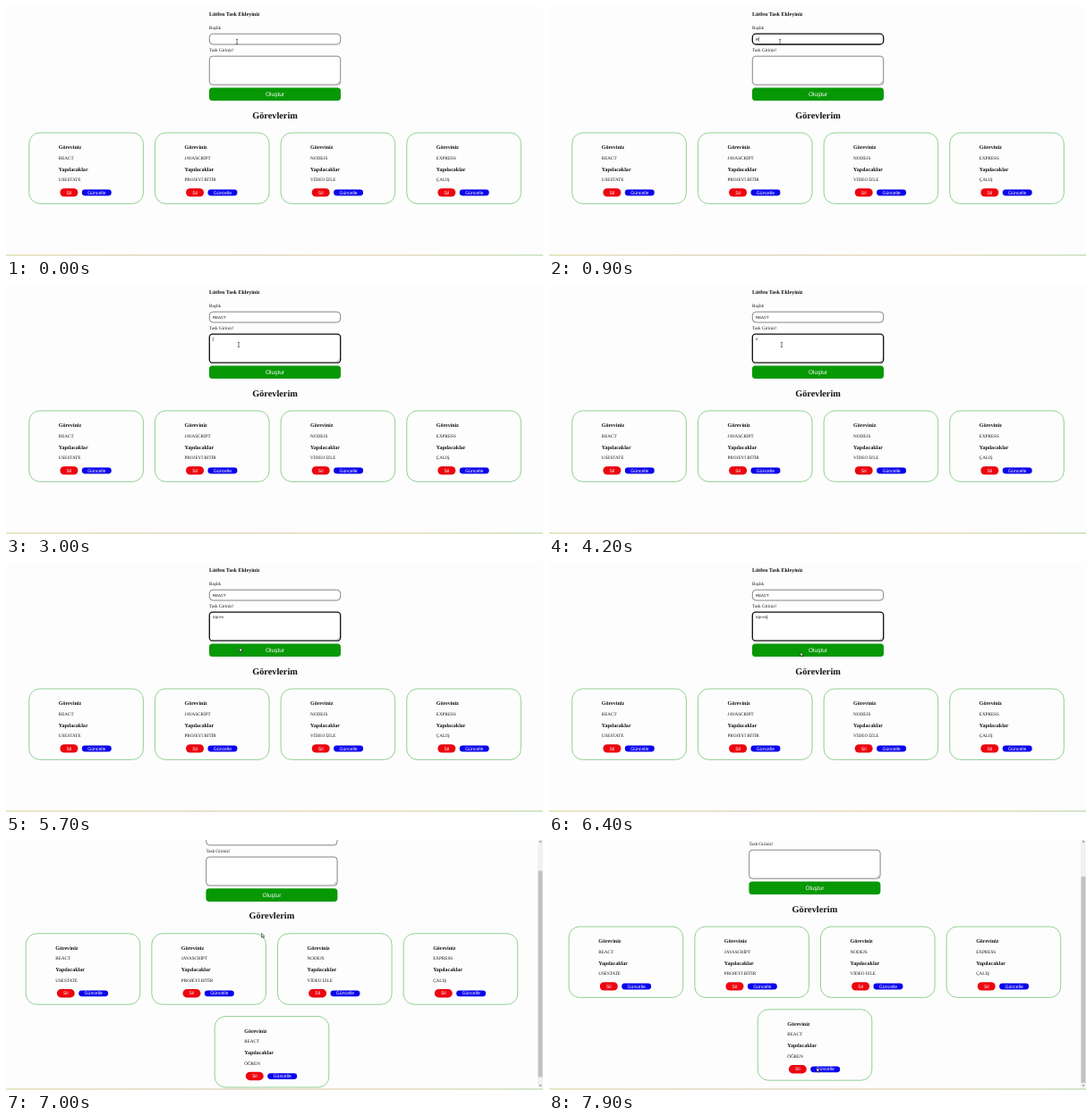
An HTML page that plays this animation: 600 px wide and 280 px high, repeating every 8 s.

```html
<!DOCTYPE html>
<html lang="tr">
<head>
<meta charset="utf-8">
<title>Görevlerim</title>
<style>
  html, body { margin: 0; width: 100%; height: 100%; overflow: hidden; background: #fefdfe; }
  svg { display: block; width: 600px; height: 280px; }
  text { font: 5.15px "Liberation Serif", "Times New Roman", serif; fill: #111; text-rendering: geometricPrecision; }
  .h3 { font-size: 6.03px; font-weight: bold; }
  .h1 { font-size: 10.3px; font-weight: bold; text-anchor: middle; }
  .btn { font-family: "Liberation Sans", Arial, sans-serif; fill: #fff; text-anchor: middle; }
  .big { font-size: 6.5px; }
  .field { font: 4.35px "Liberation Sans", Arial, sans-serif; }
  .mono { font: 4.1px "Liberation Mono", monospace; }
  .box { fill: #fff; stroke: #666; stroke-width: .8; }
  .box.on { stroke: #0c0c0c; stroke-width: 1.3; }
  .card { fill: none; stroke: #86cb86; stroke-width: .9; }
</style>
</head>
<body>
<svg id="stage" viewBox="0 0 600 280">
  <defs>
    <linearGradient id="strip">
      <stop offset="0" stop-color="#e9e6c6"/>
      <stop offset=".35" stop-color="#e6e0cf"/>
      <stop offset=".7" stop-color="#eee2cd"/>
      <stop offset="1" stop-color="#d5e6cb"/>
    </linearGradient>
  </defs>
</svg>
<script>
const LOOP = 8000, STEP = 100, SUBMIT = 6500;
const stage = document.getElementById('stage');

function add(parent, tag, attrs = {}, text = '') {
  const el = document.createElementNS('http://www.w3.org/2000/svg', tag);
  for (const key in attrs) el.setAttribute(key, attrs[key]);
  el.textContent = text;
  return parent.appendChild(el);
}
const rect = (p, x, y, width, height, rx, more) => add(p, 'rect', { x, y, width, height, rx, ...more });
const label = (p, x, y, text, cls = '') => add(p, 'text', { x, y, class: cls }, text);
const show = (el, on) => el.setAttribute('visibility', on ? 'visible' : 'hidden');
const move = (el, x, y) => el.setAttribute('transform', `translate(${x} ${y})`);

const page = add(stage, 'g');

// Form
label(page, 227, 10.9, 'Lütfen Task Ekleyiniz', 'h3');
label(page, 227, 26.3, 'Başlık');
const titleBox = rect(page, 227.3, 31.2, 146.4, 11.8, 4, { class: 'box' });
label(page, 227, 51, 'Task Giriniz!');
const taskBox = rect(page, 227.3, 56.2, 146.4, 32, 3.5, { class: 'box' });
add(page, 'path', { d: 'M369.6 87.2l3-3M371.2 87.2l1.4-1.4', stroke: '#777', 'stroke-width': .5 });
rect(page, 227, 91.5, 147, 14.6, 3.6, { fill: '#079806' });
label(page, 300.5, 101.1, 'Oluştur', 'btn big');
label(page, 300.5, 125.6, 'Görevlerim', 'h1');
const titleText = label(page, 231, 38.8, '', 'field');
const taskText = label(page, 231, 63.4, '', 'mono');
const caret = add(page, 'path', { d: 'M0 0v4.6', stroke: '#111', 'stroke-width': .5 });

// Task cards
function card(x, y, title, task) {
  const g = add(page, 'g');
  move(g, x, y);
  rect(g, 0, 0, 127.6, 79.4, 12, { class: 'card' });
  label(g, 33, 18.2, 'Göreviniz', 'h3');
  label(g, 33, 29.5, title);
  label(g, 33, 42.7, 'Yapılacaklar', 'h3');
  label(g, 33, 54.2, task);
  rect(g, 34.6, 62.2, 20, 9.4, 4.7, { fill: '#ec0610' });
  label(g, 44.6, 68.7, 'Sil', 'btn');
  rect(g, 59, 63.6, 33, 6.8, 3.4, { fill: '#0a05ec' });
  label(g, 75.5, 68.7, 'Güncelle', 'btn');
  return g;
}
[['REACT', 'USESTATE'], ['JAVASCRİPT', 'PROJEYİ BİTİR'], ['NODEJS', 'VİDEO İZLE'], ['EXPRESS', 'ÇALIŞ']]
  .forEach((c, i) => card(25.8 + i * 140.65, 142, ...c));
const newCard = card(236.8, 234.8, 'REACT', 'ÖĞREN');

// Scrollbar and bottom strip
const bar = add(stage, 'g');
rect(bar, 594, 0, 6, 278, 0, { fill: '#f1f1f1' });
const thumb = rect(bar, 594.5, 4, 5, 231, 0, { fill: '#c1c1c1' });
add(bar, 'path', { d: 'M595.8 2.2l1.3-1.5 1.3 1.5zM595.8 274.6l1.3 1.5 1.3-1.5z', fill: '#555' });
rect(stage, 0, 278, 600, 2, 0, { fill: 'url(#strip)' });

// Mouse pointers
const beam = add(stage, 'path', { d: 'M-1.1 -2.6h2.2M0 -2.6v5.2M-1.1 2.6h2.2', stroke: '#222', 'stroke-width': .6 });
const arrow = add(stage, 'path', {
  d: 'M0 0v4.6l1.1-1 .8 1.8.8-.4-.8-1.7h1.5z', fill: '#fff', stroke: '#111', 'stroke-width': .55
});

// Keys are [time, ...values]
const mouse = [[0, 258, 40], [2600, 258, 40], [2900, 260, 68], [5200, 260, 68], [5600, 261, 96],
  [6000, 261, 96], [6400, 281, 101], [6800, 281, 101], [7000, 285.5, 104.5], [7200, 286, 106], [7700, 299, 255]];
const scroll = [[6700, 0], [6800, .9], [6900, 18], [7000, 37.2], [7100, 43.5], [7200, 45]];
const titleKeys = [700, 1000, 1200, 1500, 1800];
const taskKeys = [3600, 4300, 4500, 4700, 4900];

function at(keys, t) {
  const n = keys.findIndex(k => k[0] > t);
  if (n < 1) return (n ? keys[keys.length - 1] : keys[0]).slice(1);
  const a = keys[n - 1], b = keys[n], u = (t - a[0]) / (b[0] - a[0]);
  return a.slice(1).map((v, i) => v + (b[i + 1] - v) * u);
}

function draw(t) {
  const sent = t >= SUBMIT;
  const inTitle = t >= 400 && t < 3000;
  const inTask = t >= 3000 && !sent;
  const typed = keys => sent ? 0 : keys.filter(k => k <= t).length;
  const nTitle = typed(titleKeys), nTask = typed(taskKeys);

  titleText.textContent = 'REACT'.slice(0, nTitle);
  taskText.textContent = 'öğren'.slice(0, nTask);
  titleBox.classList.toggle('on', inTitle);
  taskBox.classList.toggle('on', inTask);

  const last = Math.max(inTitle ? 400 : 3000, ...titleKeys.concat(taskKeys).filter(k => k <= t));
  show(caret, (inTitle || inTask) && (t - last) % 1060 < 530);
  if (inTitle) move(caret, 231.3 + titleText.getComputedTextLength(), 34.8);
  else move(caret, 231.3 + taskText.getComputedTextLength(), 59.6);

  const [y] = at(scroll, t);
  move(page, sent ? -3.6 : 0, -y);
  show(newCard, sent);
  show(bar, sent);
  thumb.setAttribute('y', 4 + y * .82);

  const [mx, my] = at(mouse, t);
  const overText = t < 5500;
  show(beam, overText);
  show(arrow, !overText);
  move(overText ? beam : arrow, mx, my);
}

const start = performance.now();
function tick() {
  const t = (performance.now() - start) % LOOP;
  draw(Math.floor(t / STEP) * STEP);
  requestAnimationFrame(tick);
}
tick();
</script>
</body>
</html>
```
